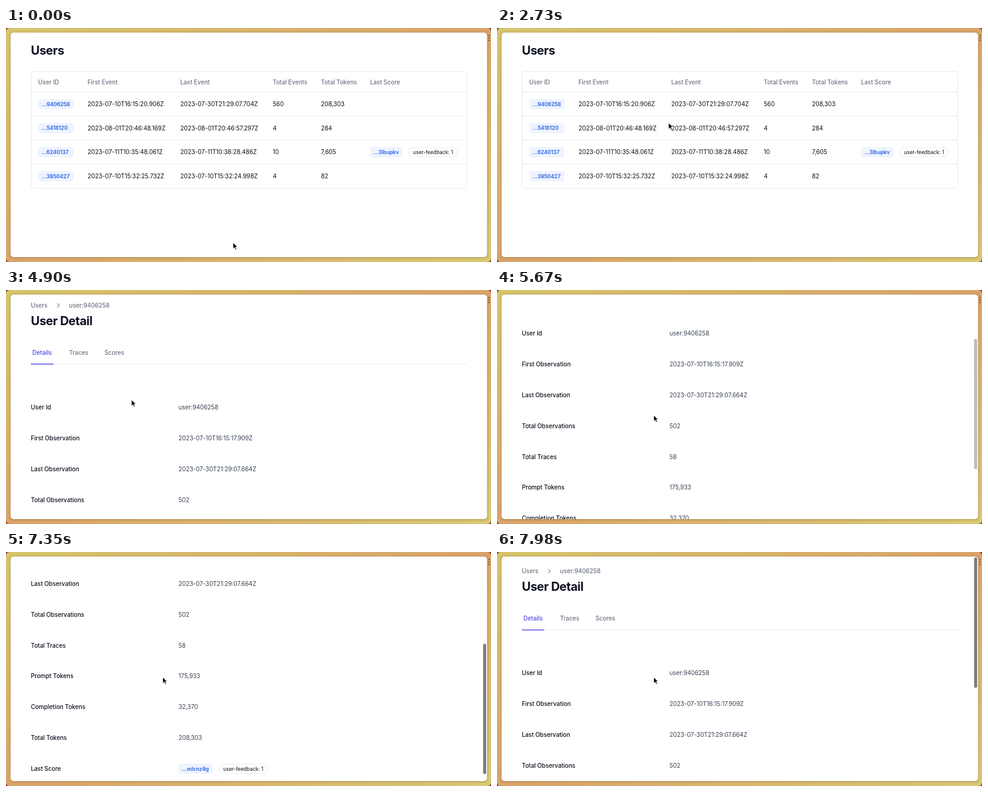
These frames come from a looping animation (800 by 386 pixels, 8 s). An HTML page:

```html
<!DOCTYPE html>
<html lang="en">
<head>
<meta charset="utf-8">
<title>Users</title>
<style>
  html, body { margin: 0; width: 100%; height: 100%; overflow: hidden; background: #d8b26a; }
  svg { display: block; width: 100vw; height: 100vh; font-family: Inter, "Noto Sans", sans-serif; font-size: 9.8px; fill: #0b0f1a; }
  .title { font-size: 20px; font-weight: 700; letter-spacing: -0.5px; fill: #0f1222; }
  .muted { font-weight: 500; fill: #6b7280; }
  .label { font-weight: 500; }
  .value { fill: #374151; }
  .active { font-weight: 500; fill: #4f46e5; }
  .badge { font-size: 8.5px; font-weight: 700; fill: #3b6fe0; }
  .pill { font-size: 8.4px; }
  .line { fill: none; stroke: #e9ebef; }
</style>
</head>
<body>
<svg id="stage" viewBox="0 0 800 386" preserveAspectRatio="none">
  <defs>
    <linearGradient id="wall" x2="1" y2="1">
      <stop offset="0" stop-color="#d6c56c"/>
      <stop offset=".5" stop-color="#d9a369"/>
      <stop offset="1" stop-color="#d8c873"/>
    </linearGradient>
    <filter id="soft" x="-5%" y="-5%" width="110%" height="110%"><feGaussianBlur stdDeviation="1.5"/></filter>
    <clipPath id="pane"><rect x="7.5" y="7.5" width="786" height="370.5" rx="5"/></clipPath>
  </defs>
  <rect width="800" height="386" fill="#8a3f26"/>
  <rect width="800" height="386" rx="6" fill="url(#wall)"/>
  <g fill="#8b5a2e">
    <circle cx="796.8" cy="12.5" r="1.2"/><circle cx="796.8" cy="16.5" r="1.2"/><circle cx="796.8" cy="20.5" r="1.2"/>
  </g>
  <rect x="7" y="7.5" width="787" height="371.5" rx="5.5" fill="#7d5426" opacity=".5" filter="url(#soft)"/>
  <rect x="7.5" y="7.5" width="786" height="370.5" rx="5" fill="#fff"/>
  <g clip-path="url(#pane)">
    <g id="list"></g>
    <g id="detail"></g>
    <rect id="thumb" x="787" width="5" height="215" rx="2.5" fill="#7d7d7d"/>
  </g>
  <path id="cursor" d="M0 0V10.2L2.4 8L4.1 11.8L5.9 11L4.2 7.3H7.4Z" fill="#000" stroke="#fff" stroke-width=".8" stroke-linejoin="round"/>
</svg>
<script>
const LOOP = 8000, STEP = 70, OPEN_AT = 3570;
const SCROLL_DOWN = 5550, SCROLL_UP = 7280, BOTTOM = 265;
const $ = id => document.getElementById(id);

const text = (x, mid, str, cls = '') => `<text x="${x}" y="${mid + 3.5}" class="${cls}">${str}</text>`;
const line = (x1, x2, y) => `<path class="line" d="M${x1} ${y}H${x2}"/>`;
const badge = (x, mid, width, str) =>
  `<rect x="${x}" y="${mid - 8.5}" width="${width}" height="17" rx="4" fill="#eef3ff"/>` +
  `<text x="${x + 5.5}" y="${mid + 3}" class="badge">${str}</text>`;
const pill = (x, mid, str) =>
  `<rect class="line" x="${x}" y="${mid - 7.75}" width="80.5" height="15.5" rx="7.75"/>` +
  `<text x="${x + 7.3}" y="${mid + 3}" class="pill">${str}</text>`;
const score = (x, mid, width, id) => badge(x, mid, width, id) + pill(x + width + 10, mid, 'user-feedback: 1');

const USER = '9406258';
const COLUMNS = [
  ['User ID', 53], ['First Event', 134.5], ['Last Event', 287.5],
  ['Total Events', 440], ['Total Tokens', 519.5], ['Last Score', 600.5]
];
const USERS = [
  [USER, '2023-07-10T16:15:20.906Z', '2023-07-30T21:29:07.704Z', '560', '208,303'],
  ['5418120', '2023-08-01T20:46:48.169Z', '2023-08-01T20:46:57.297Z', '4', '284'],
  ['6240137', '2023-07-11T10:35:48.061Z', '2023-07-11T10:38:28.486Z', '10', '7,605'],
  ['3950427', '2023-07-10T15:32:25.732Z', '2023-07-10T15:32:24.998Z', '4', '82']
];
const FACTS = [
  ['User Id', 'user:' + USER],
  ['First Observation', '2023-07-10T16:15:17.909Z'],
  ['Last Observation', '2023-07-30T21:29:07.664Z'],
  ['Total Observations', '502'],
  ['Total Traces', '58'],
  ['Prompt Tokens', '175,933'],
  ['Completion Tokens', '32,370'],
  ['Total Tokens', '208,303'],
  ['Last Score', '']
];
const rowMid = row => 125.5 + row * 39.7;
const factMid = row => 193.5 + row * 50.85;

function listPage() {
  let out = '<text x="41" y="44" class="title">Users</text>' +
    '<rect class="line" x="41.5" y="71.5" width="718.5" height="193" rx="4"/>';
  COLUMNS.forEach(([name, x]) => out += text(x, 89, name, 'muted'));
  USERS.forEach(([id, ...cells], row) => {
    const mid = rowMid(row);
    out += line(42, 760, Math.round(mid - 20.5) + .5) + badge(53, mid, 58, '...' + id);
    cells.forEach((cell, i) => out += text(COLUMNS[i + 1][1], mid, cell));
  });
  return out + score(600.5, rowMid(2), 53.5, '...3lbupkv');
}

function detailPage() {
  let out = text(41, 25.5, 'Users', 'muted') + text(104, 25.5, 'user:' + USER, 'muted') +
    '<path d="M84.5 22L88 25.5L84.5 29" fill="none" stroke="#8b919c" stroke-width="1.1"/>' +
    '<text x="41" y="58" class="title">User Detail</text>' +
    text(43.5, 103.5, 'Details', 'active') + text(104, 103.5, 'Traces', 'muted') +
    text(162.5, 103.5, 'Scores', 'muted') + line(41, 760, 122.5) +
    '<rect x="41" y="121.5" width="37" height="1.5" fill="#5b53e8"/>';
  FACTS.forEach(([name, value], i) => {
    out += text(41, factMid(i), name, 'label') + text(284.5, factMid(i), value, 'value');
  });
  return out + score(284.5, factMid(FACTS.length - 1), 56.5, '...mlcnz9g');
}

const clamp = p => Math.min(1, Math.max(0, p));
const smooth = p => p * p * (3 - 2 * p);

const REST = { x: 374.5, y: 354 };
const MOVES = [
  { from: 490, to: 1400, x: 538, y: 99 },
  { from: 1540, to: 2730, x: 283, y: 156.5 },
  { from: 2800, to: 3430, x: 90, y: 126 },
  { from: 3570, to: 4060, x: 112, y: 134.5 },
  { from: 4270, to: 5320, x: 258.5, y: 206.5 }
];

function pointerAt(t) {
  return MOVES.reduce((pos, { from, to, x, y }) => {
    const p = smooth(clamp((t - from) / (to - from)));
    return { x: pos.x + (x - pos.x) * p, y: pos.y + (y - pos.y) * p };
  }, REST);
}

// A flick that coasts to the bottom, then one that overshoots the top and settles.
function scrollAt(t) {
  if (t < SCROLL_UP) return BOTTOM * (1 - Math.exp(-Math.max(0, t - SCROLL_DOWN) / 195));
  const u = t - SCROLL_UP;
  return BOTTOM * Math.exp(-((u / 362) ** 2)) * Math.cos(Math.PI * u / 700);
}

function render(time) {
  const t = Math.floor(time % LOOP / STEP) * STEP;
  const opened = t >= OPEN_AT;
  const pointer = pointerAt(t), scroll = scrollAt(t);
  $('list').setAttribute('display', opened ? 'none' : 'inline');
  $('detail').setAttribute('display', opened ? 'inline' : 'none');
  $('detail').setAttribute('transform', `translate(0 ${-scroll})`);
  $('thumb').setAttribute('y', Math.max(9, 9.5 + scroll * .584));
  $('thumb').setAttribute('opacity', clamp((t - SCROLL_DOWN) / 240));
  $('cursor').setAttribute('transform', `translate(${pointer.x} ${pointer.y})`);
}

$('list').innerHTML = listPage();
$('detail').innerHTML = detailPage();
const start = performance.now();
function tick() {
  render(performance.now() - start);
  requestAnimationFrame(tick);
}
tick();
</script>
</body>
</html>
```
